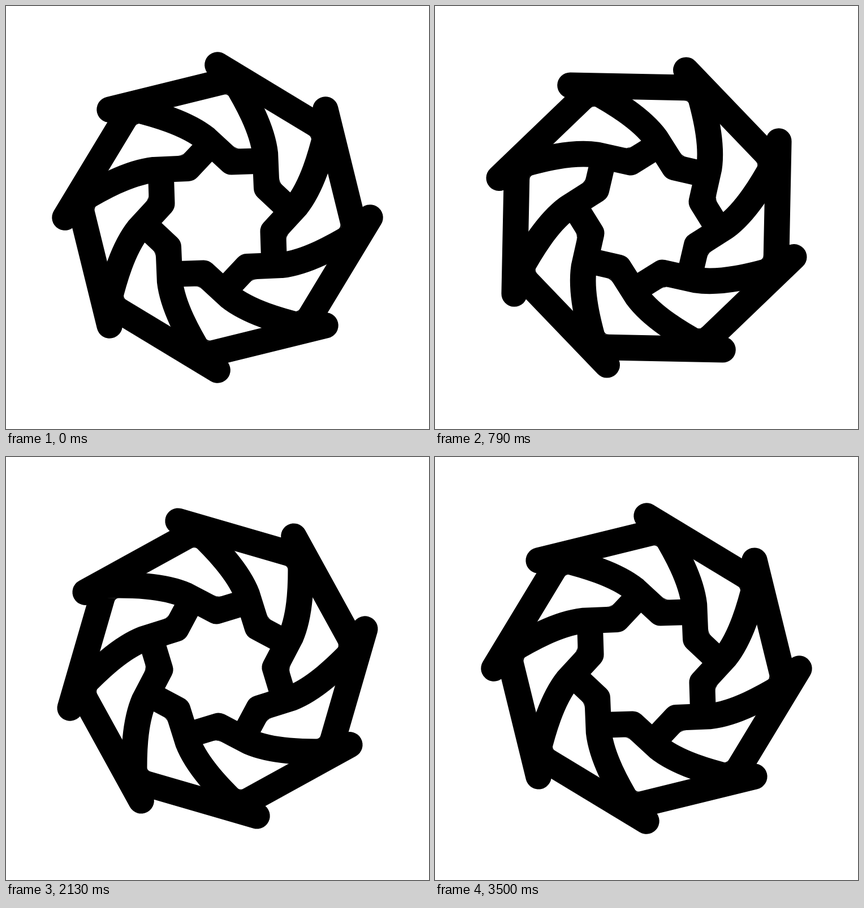
Animation of 748 by 748 pixels, one loop 4000 ms. Source, as an HTML page with a canvas:

```html
<!DOCTYPE html>
<html lang="en">
<head>
<meta charset="utf-8">
<title>Turning rosette</title>
<style>
  html, body { margin: 0; width: 100%; height: 100%; overflow: hidden; background: #fff; }
  canvas { display: block; }
</style>
</head>
<body>
<canvas id="stage" width="748" height="748"></canvas>
<script>
const SIZE = 748, MID = SIZE / 2, ARMS = 8;
const LOOP = 4000, FPS = 24, STEP = -75;
// start and length of each turn, in ms
const TURNS = [[0, 772], [1320, 796], [2640, 886]];

const ctx = document.getElementById('stage').getContext('2d');

// One arm: outer bar, curved spoke, short hook at the hub
const arm = new Path2D();
arm.moveTo(374, 104.1);
arm.lineTo(567.3, 221);
arm.bezierCurveTo(557, 263, 541.5, 318.5, 513.5, 353.7);
arm.lineTo(472.3, 398.5);
arm.lineTo(474, 450);

// Soft inner corners of the arm
const fillets = new Path2D();
function fillet(x1, y1, cx, cy, x2, y2) {
  fillets.moveTo(x1, y1);
  fillets.quadraticCurveTo(cx, cy, x2, y2);
  fillets.lineTo(cx, cy);
  fillets.closePath();
}
fillet(535, 228, 541.8, 232.3, 539.5, 240.5);
fillet(501, 401.3, 495.4, 407, 495.6, 415);

// Cubic bezier easing (1/3, 0, 0.2, 1)
function ease(x) {
  if (x <= 0) return 0;
  if (x >= 1) return 1;
  let lo = 0, hi = 1;
  for (let i = 0; i < 30; i++) {
    const s = (lo + hi) / 2, r = 1 - s;
    if (r * r * s + 0.6 * r * s * s + s * s * s < x) lo = s; else hi = s;
  }
  return lo * lo * (3 - 2 * lo);
}

function angleAt(ms) {
  return TURNS.reduce((sum, [start, length]) => sum + STEP * ease((ms - start) / length), 0);
}

function draw(ms) {
  const tick = Math.floor((ms % LOOP + 4) * FPS / 1000) % (LOOP * FPS / 1000);
  const turn = angleAt(tick * 1000 / FPS) * Math.PI / 180;
  ctx.setTransform(1, 0, 0, 1, 0, 0);
  ctx.fillStyle = '#fff';
  ctx.fillRect(0, 0, SIZE, SIZE);
  ctx.fillStyle = ctx.strokeStyle = '#000';
  ctx.lineWidth = 45.7;
  ctx.lineCap = ctx.lineJoin = 'round';
  for (let i = 0; i < ARMS; i++) {
    ctx.setTransform(1, 0, 0, 1, MID, MID);
    ctx.rotate(turn + i * 2 * Math.PI / ARMS);
    ctx.translate(-MID, -MID);
    ctx.stroke(arm);
    ctx.fill(fillets);
  }
}

const begin = performance.now();
function loop() {
  draw(performance.now() - begin);
  requestAnimationFrame(loop);
}
loop();
</script>
</body>
</html>
```
